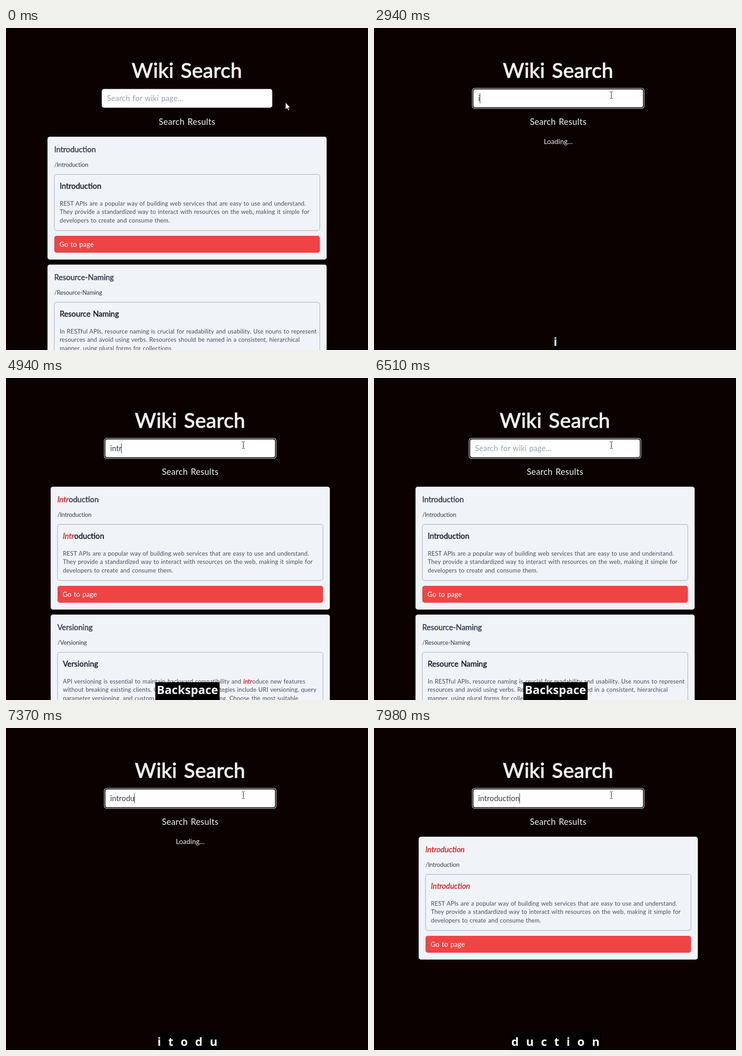
An HTML page for the animation above (8 s loop, 794x705 px).

```html
<!DOCTYPE html>
<html lang="en">
<head>
<meta charset="utf-8">
<title>Wiki Search</title>
<style>
  html, body { margin: 0; width: 100%; height: 100%; overflow: hidden; background: #0c0101; }
  svg { display: block; width: 794px; height: 705px; }
  text { font-family: Lato, "Open Sans", sans-serif; word-spacing: .067em; letter-spacing: .01em; }
  .mid { text-anchor: middle; }
  .title { font-size: 44.9px; fill: #f1f1f2; stroke: #f1f1f2; stroke-width: 1.2px; }
  .sub { font-size: 18.7px; fill: #f1f5f9; letter-spacing: .017em; }
  .load { font-size: 14.96px; fill: #f1f5f9; }
  .field { font-size: 16.83px; fill: #3b3b45; letter-spacing: 0; }
  .hint { font-size: 16.83px; fill: #94a3b0; }
  .card { fill: #f0f4f8; }
  .name, .head { font-size: 16.83px; letter-spacing: 0; stroke-width: .55px; }
  .name { fill: #3a4256; stroke: #3a4256; }
  .head { fill: #1b2131; stroke: #1b2131; }
  .path { font-size: 13.09px; fill: #343b4b; letter-spacing: -.012em; }
  .para { font-size: 13.09px; fill: #475060; }
  .frame { fill: none; stroke: #98a4b3; }
  .button { fill: #ef4444; }
  .go { font-size: 14.96px; fill: #fff; }
  .hit { fill: #dc2c2c; stroke: #dc2c2c; stroke-width: .5px; font-style: italic; }
  .keys { font: bold 25.6px "Open Sans", "Noto Sans", sans-serif; fill: #fff; letter-spacing: 0; word-spacing: 9.3px; }
</style>
</head>
<body>
<svg viewBox="0 0 794 705" xmlns="http://www.w3.org/2000/svg">
  <g id="page">
    <text class="title mid" x="397" y="108.5">Wiki Search</text>
    <g id="ring">
      <rect x="208" y="131.5" width="378" height="45" rx="6" fill="#fff"/>
      <rect x="209" y="132.5" width="376" height="43" rx="5" fill="#0c0c0c"/>
    </g>
    <rect id="box" fill="#fff"/>
    <text class="hint" id="hint" x="221.5" y="160">Search for wiki page...</text>
    <text class="field" id="field" x="221.5" y="160"></text>
    <rect id="caret" y="143" width="1" height="22" fill="#222"/>
    <text class="sub mid" x="397" y="212">Search Results</text>
    <text class="load mid" id="load" x="397" y="254">Loading...</text>
    <g id="cards"></g>
  </g>
  <g id="overlay">
    <rect id="keyBox" y="666" height="39"/>
    <text class="keys mid" id="keys" x="398"></text>
  </g>
  <g id="mouse">
    <path id="arrow" d="M0 0V15.5L3.6 12.2L6 17.8L8.4 16.8L6 11.2H10.6Z" fill="#fff" stroke="#000" stroke-width=".8"/>
    <path id="beam" d="M-3 -7.5H-1L0 -6.5L1 -7.5H3M0 -6.5V6.5M-3 7.5H-1L0 6.5L1 7.5H3" transform="translate(.5 0)" fill="none" stroke="#111"/>
  </g>
</svg>
<script>
const LOOP = 8000, BLINK = 530, FOCUS = 1600;
const $ = id => document.getElementById(id);

const intro = {
  name: 'Introduction', head: 'Introduction',
  lines: ['REST APIs are a popular way of building web services that are easy to use and understand.',
    'They provide a standardized way to interact with resources on the web, making it simple for',
    'developers to create and consume them.']
};
const naming = {
  name: 'Resource-Naming', head: 'Resource Naming',
  lines: ['In RESTful APIs, resource naming is crucial for readability and usability. Use nouns to represent',
    'resources and avoid using verbs. Resources should be named in a consistent, hierarchical',
    'manner, using plural forms for collections.']
};
const versions = {
  name: 'Versioning', head: 'Versioning',
  lines: ['API versioning is essential to maintain backward compatibility and introduce new features',
    'without breaking existing clients. Common versioning strategies include URI versioning, query',
    'parameter versioning, and custom request header versioning. Choose the most suitable']
};

// time, query, pressed keys, loading
const steps = [
  [0, '', ''],
  [2940, 'i', 'i', 1], [2990, 'i', 'i'],
  [3140, 'in', 'i n'],
  [3350, 'int', 'i t', 1], [3380, 'int', 'i t'],
  [3710, 'intr', 'r'], [3860, 'intro', 'r o'], [4190, 'intro', ''],
  [4720, 'intr', 'Backspace'], [4990, 'int', 'Backspace'], [5250, 'in', 'Backspace'],
  [5470, 'i', 'Backspace'], [5720, '', 'Backspace'],
  [6590, 'i', 'i'], [6700, 'in', 'i n'], [6830, 'int', 'i t'],
  [6990, 'intr', 'i t'], [7100, 'intro', 'i t o'],
  [7260, 'introd', 'i t o d', 1], [7310, 'introd', 'i t o d'],
  [7370, 'introdu', 'i t o d u', 1], [7420, 'introdu', 'i t o d u'],
  [7450, 'introduc', 'i t o d u c', 1], [7480, 'introduc', 'i t o d u c'],
  [7650, 'introduct', 'd u c t', 1], [7700, 'introduct', 'd u c t'],
  [7760, 'introducti', 'd u c t i', 1], [7810, 'introducti', 'd u c t i'],
  [7870, 'introductio', 'd u c t i o', 1],
  [7930, 'introduction', 'd u c t i o n', 1], [7980, 'introduction', 'd u c t i o n']
];

// Typing restarts the caret blink, deleting does not.
const restarts = [FOCUS];
steps.forEach(([time, query], i) => {
  if (i && query.length > steps[i - 1][1].length) restarts.push(time);
});

const show = (id, on) => $(id).setAttribute('visibility', on ? 'visible' : 'hidden');
const place = (id, attrs) => { for (const k in attrs) $(id).setAttribute(k, attrs[k]); };
const text = (cls, x, y, body) => `<text class="${cls}" x="${x}" y="${y}">${body}</text>`;
const rect = (cls, x, y, w, h) => `<rect class="${cls}" x="${x}" y="${y}" width="${w}" height="${h}" rx="5"/>`;

function mark(body, query) {
  return query ? body.replace(new RegExp('\\b' + query, 'i'), '<tspan class="hit">$&</tspan>') : body;
}

function card({ name, head, lines }, i, query) {
  const title = mark(head, query);
  const first = title === head ? mark(lines[0], query) : lines[0];
  return `<g transform="translate(0 ${i * 280})">` +
    rect('card', 91, 238, 612.3, 269) +
    text('name', 105.7, 272, mark(name, query)) +
    text('path', 105.7, 303.7, '/' + name) +
    rect('frame', 106, 320.5, 582.3, 122.8) +
    text('head', 117.7, 351.5, title) +
    [first, lines[1], lines[2]].map((l, n) => text('para', 117.7, 388.6 + n * 18.7, l)).join('') +
    rect('button', 106, 455, 582.5, 37) +
    text('go', 117, 479, 'Go to page') + '</g>';
}

function results(query) {
  if (query.length < 3) return [intro, naming];
  return query.length < 9 ? [intro, versions] : [intro];
}

function drawStep([, query, keys, loading]) {
  const shift = loading || query.length > 2 ? 7 : 0;
  place('page', { transform: `translate(${shift} 0)` });
  $('field').textContent = query;
  const width = query ? $('field').getComputedTextLength() : 0;
  place('caret', { x: Math.round(221 + width) });
  show('hint', !query);
  show('load', loading);
  $('cards').innerHTML = loading ? '' : results(query).map((c, i) => card(c, i, query)).join('');

  show('overlay', keys);
  $('keys').textContent = keys;
  place('keys', { y: keys.length > 1 && !keys.includes(' ') ? 692 : 695.5 });
  const w = keys ? Math.round($('keys').getComputedTextLength() + 7) : 0;
  place('keyBox', { x: 398 - w / 2, width: w });
}

function drawMouse(t) {
  const tick = Math.floor((t - 1220) / 48.5) + 1;
  const p = Math.min(1, Math.max(0, tick / 14));
  const ease = 1 - (1 - p) ** 3;
  const x = Math.round(613 - 93 * ease), y = Math.round(163 - 16 * ease);
  const over = x < 584;
  place('mouse', { transform: `translate(${x} ${y})` });
  show('arrow', !over);
  show('beam', over);
}

let last;
function draw(t) {
  const step = steps.findLast(s => s[0] <= t);
  if (step !== last) drawStep(last = step);
  const focused = t >= FOCUS;
  show('ring', focused);
  place('box', focused
    ? { x: 211, y: 134.5, width: 372, height: 39, rx: 4 }
    : { x: 210, y: 133.5, width: 374, height: 41, rx: 5 });
  const since = t - (restarts.findLast(r => r <= t) ?? t);
  show('caret', focused && Math.floor(since / BLINK) % 2 === 0);
  drawMouse(t);
}

const start = performance.now();
function loop() {
  draw((performance.now() - start) % LOOP);
  requestAnimationFrame(loop);
}
loop();
</script>
</body>
</html>
```
